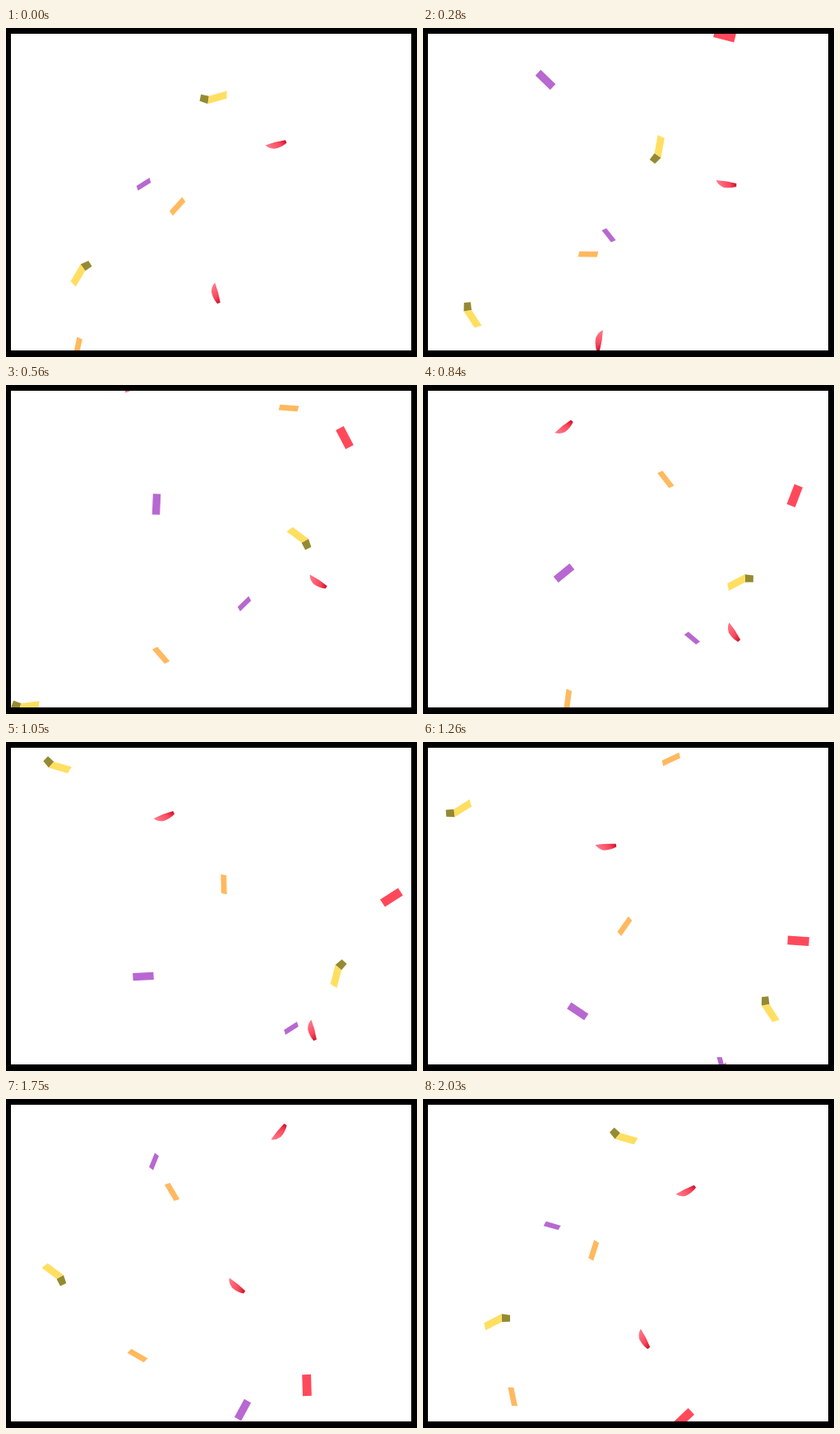
Animation, 500 px wide and 400 px high, one loop 2100 ms. Source, as an HTML page with a canvas:

```html
<!DOCTYPE html>
<html lang="en">
<head>
<meta charset="utf-8">
<title>Falling confetti</title>
<style>
  html, body { margin: 0; width: 100%; height: 100%; overflow: hidden; background: #000; }
  canvas { display: block; }
</style>
</head>
<body>
<canvas id="stage" width="500" height="400"></canvas>
<script>
const ctx = document.getElementById('stage').getContext('2d');
const LOOP = 2100, STEP = 70;
const FALL = LOOP + STEP; // the loop skips one step where it restarts

function polygon(color, ...points) {
  ctx.fillStyle = color;
  ctx.beginPath();
  for (let i = 0; i < points.length; i += 2) ctx.lineTo(points[i], points[i + 1]);
  ctx.fill();
}

// Slanted strip centred on the origin: half length, half height, half slant
const strip = (color, l, h, s = 0) => () =>
  polygon(color, -l + s, -h, l + s, -h, l - s, h, -l - s, h);

function fold() {
  polygon('#958a33', 2, -4.8, -6.8, -9.2, -10.6, -2, -2, 4);
  polygon('#ffdf62', 2, -4.8, 24.5, -4.8, 22, 4, -2, 4);
}

const petalFill = ctx.createLinearGradient(-7, 5, 11, -4);
petalFill.addColorStop(0, '#ff7386');
petalFill.addColorStop(0.6, '#f8485c');
petalFill.addColorStop(1, '#cf0f28');

function petal() {
  ctx.fillStyle = petalFill;
  ctx.beginPath();
  ctx.moveTo(-13, -3);
  ctx.quadraticCurveTo(0, -4.2, 12, -2.8);
  ctx.lineTo(12.5, 1);
  ctx.quadraticCurveTo(5, 4.6, -3, 4.2);
  ctx.quadraticCurveTo(-10, 2.5, -13, -3);
  ctx.fill();
}

// Every kind turns at its own steady rate, in degrees per ms
const kinds = {
  fold: { draw: fold, spin: -0.228 },
  petal: { draw: petal, spin: 0.0855 },
  orange: { draw: strip('#ffb95f', 11.5, 3.4, 0.8), spin: 0.173 },
  red: { draw: strip('#ff495b', 13, 5.4), spin: 0.173 },
  purple: { draw: strip('#b868d1', 12.6, 4.7), spin: 0.173 },
  chip: { draw: strip('#b868d1', 9.3, 3, 0.8), spin: -0.343 }
};

// Gusts bend all paths at the same moments of each loop
const gusts = [280, 560, 1050, 1470, 1750, 2100];
const gustTime = n => gusts[n % gusts.length] + FALL * Math.floor(n / gusts.length);

// A piece has a first gust, its angle there, and the points where gusts catch it
const piece = (kind, first, angle, ...points) => ({
  ...kinds[kind], angle, path: points.map(([x, y], i) => ({ t: gustTime(first + i), x, y }))
});

const pieces = [
  piece('fold', 5, 0, [241, 67], [286, 155], [364, 189], [404, 274], [425, 373]),
  piece('fold', 2, 16, [55, 28], [35, 144], [66, 216], [97, 278], [54, 344], [17, 392]),
  piece('petal', 4, -51, [333, 41], [323, 128], [369, 190], [379, 240], [372, 351]),
  piece('petal', 1, -63, [153, -1], [193, 91], [254, 165], [280, 228], [262, 308], [214, 380]),
  piece('orange', 3, 11, [247, 57], [202, 113], [209, 201], [201, 275]),
  piece('orange', 1, 4, [344, 28], [265, 173], [224, 268], [160, 312], [98, 375]),
  piece('chip', 4, 112, [180, 76], [160, 172], [226, 252], [290, 266], [347, 348]),
  piece('purple', 0, 44, [149, 63], [183, 145], [167, 285], [223, 359], [288, 378], [350, 418]),
  piece('red', 0, 14, [367, 9], [412, 64], [469, 189], [427, 292], [366, 348], [306, 397])
];

const slope = (a, b, k) => (b[k] - a[k]) / (b.t - a.t);

// Speed at a point; the ends carry on the bend of their neighbour
function speed(path, i, k) {
  const last = path.length - 1;
  if (i === 0) return 2 * slope(path[0], path[1], k) - speed(path, 1, k);
  if (i === last) return 2 * slope(path[i - 1], path[i], k) - speed(path, i - 1, k);
  return slope(path[i - 1], path[i + 1], k);
}

// Smooth curve through the points, straight on beyond its ends
function valueAt(path, t, k) {
  const last = path.length - 1;
  const end = t <= path[0].t ? 0 : t >= path[last].t ? last : -1;
  if (end >= 0) return path[end][k] + speed(path, end, k) * (t - path[end].t);
  const i = path.findIndex(p => p.t > t) - 1;
  const a = path[i], b = path[i + 1], span = b.t - a.t;
  const u = (t - a.t) / span, v = 1 - u;
  return v * v * (1 + 2 * u) * a[k] + u * u * (1 + 2 * v) * b[k]
    + u * v * span * (v * speed(path, i, k) - u * speed(path, i + 1, k));
}

function drawPiece({ draw, spin, angle, path }, t) {
  const y = valueAt(path, t, 'y');
  if (y < -30 || y > 430) return;
  ctx.save();
  ctx.translate(valueAt(path, t, 'x'), y);
  ctx.rotate((angle + spin * (t - path[0].t)) * Math.PI / 180);
  draw();
  ctx.restore();
}

function render() {
  const t = Math.floor(performance.now() % LOOP / STEP) * STEP;
  ctx.fillStyle = '#000';
  ctx.fillRect(0, 0, 500, 400);
  ctx.save();
  ctx.beginPath();
  ctx.rect(6, 7, 487, 385);
  ctx.clip();
  ctx.fillStyle = '#fff';
  ctx.fillRect(6, 7, 487, 385);
  for (const p of pieces) {
    drawPiece(p, t);
    drawPiece(p, t + FALL);
  }
  ctx.restore();
  requestAnimationFrame(render);
}
render();
</script>
</body>
</html>
```
